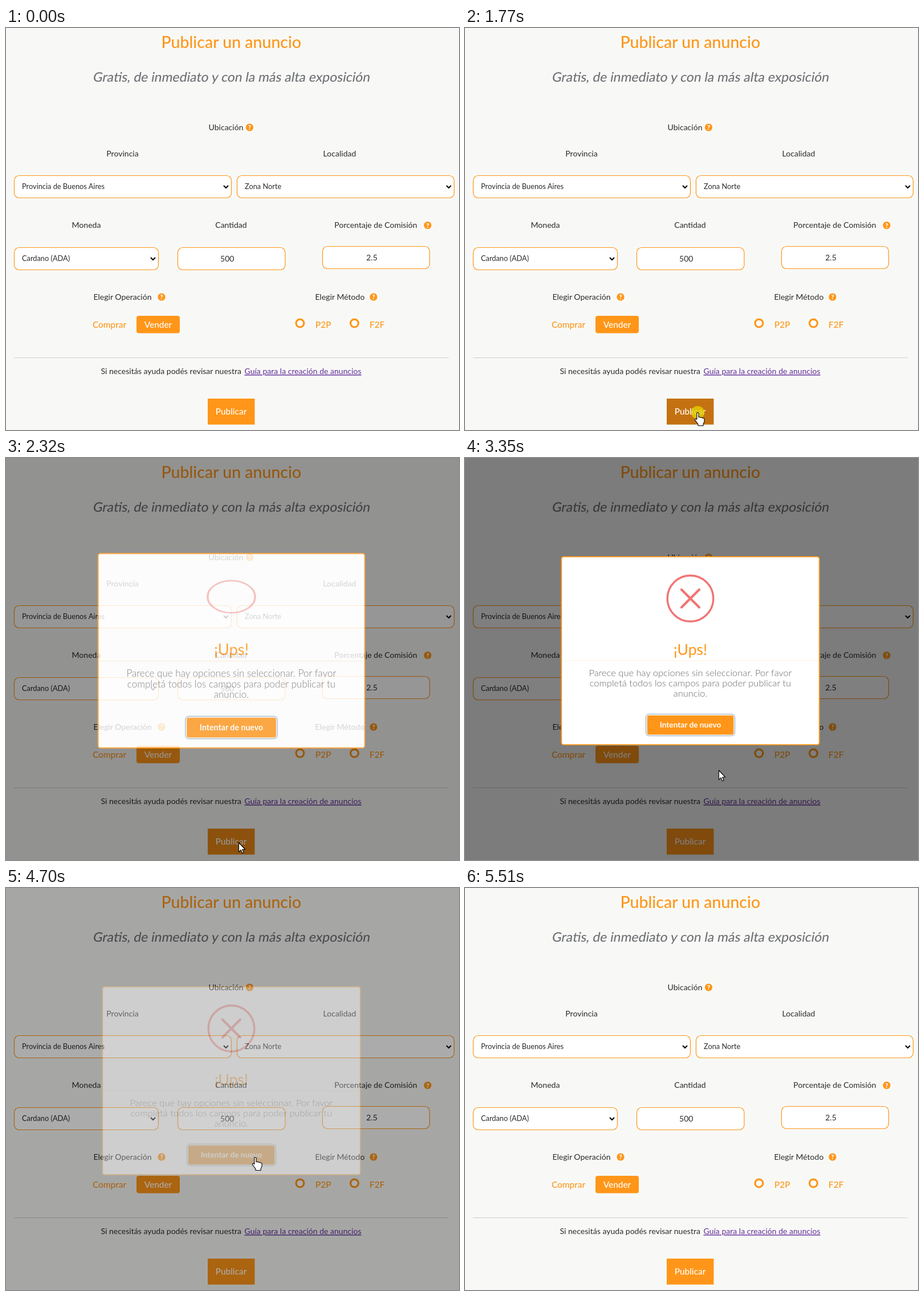
Animation of 795 by 704 pixels, one loop 6.1 s. Source, as an HTML page:

```html
<!DOCTYPE html>
<html lang="es">
<head>
<meta charset="utf-8">
<title>Publicar un anuncio</title>
<style>
html, body { margin: 0; width: 100%; height: 100%; overflow: hidden; background: #f8f9f7; }
svg { display: block; font: 14.05px Lato, "Open Sans", sans-serif; fill: #2b2b2b; }
.mid { text-anchor: middle; }
.orange { fill: #ff9619; }
.field { fill: #fff; stroke: #ff9619; stroke-width: 1.2; }
.opt { font-size: 12.8px; }
.big { font-size: 15.4px; font-weight: 500; }
.white { fill: #fff; }
.q { fill: #fff; font-size: 11px; font-weight: 900; text-anchor: middle; }
.line { fill: none; stroke: #000; stroke-width: 2; }
.mark { fill: none; stroke: #f27474; }
.cursor { fill: #fff; stroke: #000; stroke-width: 1.1; stroke-linejoin: round; }
</style>
</head>
<body>
<svg width="795" height="704" viewBox="0 0 795 704">
  <text class="mid orange" x="395.3" y="35" font-size="28.5" font-weight="500">Publicar un anuncio</text>
  <text class="mid" transform="translate(395 93.5) skewX(-10)" font-size="22.95" font-weight="500" fill="#707175">Gratis, de inmediato y con la más alta exposición</text>
  <g id="form">
    <path d="M14 577.5H777" stroke="#cfcfcd"/>
    <rect class="orange" x="229" y="504" width="76" height="30.5" rx="4"/>
    <rect id="publish" x="354" y="649" width="82.5" height="45.5"/>
    <text x="166.5" y="606">Si necesitás ayuda podés revisar nuestra</text>
    <text x="418.5" y="606" fill="#64309a" text-decoration="underline">Guía para la creación de anuncios</text>
    <g class="big orange">
      <text x="152" y="524.5">Comprar</text>
      <text x="543" y="524.5">P2P</text>
      <text x="638" y="524.5">F2F</text>
    </g>
    <g class="big mid white">
      <text x="267" y="524.5">Vender</text>
      <text x="395" y="677">Publicar</text>
    </g>
    <g fill="#fff" stroke="#ff9619" stroke-width="3.2">
      <circle cx="516" cy="517" r="6.9"/>
      <circle cx="611.5" cy="517" r="6.9"/>
    </g>
  </g>
  <g id="modal">
    <rect width="795" height="704" fill="#000" opacity=".5"/>
    <g id="popup">
      <rect x="169.3" y="172.8" width="452.6" height="329.4" rx="4" fill="#fff" stroke="#ff9619" stroke-width="1.8"/>
      <path d="M170 355H621" stroke="#fdefdc"/>
      <circle id="ring" class="mark" r="40.3" stroke-width="3.4"/>
      <path id="cross" class="mark" d="M-15.5-15.5 15.5 15.5M15.5-15.5-15.5 15.5" stroke-width="4.2" stroke-linecap="round"/>
      <text class="mid orange" x="395.5" y="345" font-size="26.5">¡Ups!</text>
      <g class="mid" font-size="16.5" font-weight="300" fill="#686868">
        <text x="395.5" y="381.5">Parece que hay opciones sin seleccionar. Por favor</text>
        <text x="395.5" y="399.5">completá todos los campos para poder publicar tu</text>
        <text x="395.5" y="417.5">anuncio.</text>
      </g>
      <rect x="317.5" y="448.5" width="156" height="38" rx="6" fill="#fff" stroke="#adc1d5" stroke-width="1.7"/>
      <rect id="retry" x="319.8" y="450.8" width="151.6" height="33.6" rx="3.5"/>
      <text class="mid white" x="395.5" y="472" font-size="13.7" font-weight="700">Intentar de nuevo</text>
    </g>
  </g>
  <circle id="click" r="11.5" fill="#e6d200" opacity=".78"/>
  <path id="arrow" class="cursor" d="M0 0V16.4L3.7 12.9 6.2 18.6 8.7 17.5 6.2 12H11.3Z"/>
  <path id="hand" class="cursor" d="M-1.6 1Q0-1 1.6 1V8.2Q3.4 7 5 8.8 6.8 7.8 8.2 9.6 11.4 9 11.6 12V16L9.6 20V23H.6V20.6L-2.6 16-5 12.6Q-5 10-3 10.6L-1.6 12.2Z"/>
</svg>
<script>
const $ = id => document.getElementById(id);
const form = $('form');

function add(parent, tag, attrs, text = '') {
  const el = document.createElementNS('http://www.w3.org/2000/svg', tag);
  for (const key in attrs) el.setAttribute(key, attrs[key]);
  el.textContent = text;
  parent.append(el);
}

for (const [x, y, text] of [
  [386, 178.5, 'Ubicación'], [204.5, 225, 'Provincia'], [585.5, 225, 'Localidad'],
  [141, 350, 'Moneda'], [395, 350, 'Cantidad'], [649, 350, 'Porcentaje de Comisión'],
  [204.5, 476, 'Elegir Operación'], [586, 476, 'Elegir Método']
]) add(form, 'text', { class: 'mid', x, y }, text);

for (const [x, y, width, text, isSelect] of [
  [14.5, 258.5, 381, 'Provincia de Buenos Aires', true],
  [405.5, 258.5, 381, 'Zona Norte', true],
  [14.5, 384.5, 253, 'Cardano (ADA)', true],
  [301.5, 384.5, 188.5, '500'],
  [555.5, 382.5, 188, '2.5']
]) {
  add(form, 'rect', { class: 'field', x, y, width, height: 39, rx: 8.5 });
  if (isSelect) {
    add(form, 'text', { class: 'opt', x: x + 13.5, y: y + 23.5 }, text);
    add(form, 'path', { class: 'line', d: `M${x + width - 13.5} ${y + 17.5}l4 4 4-4` });
  } else {
    add(form, 'text', { class: 'mid', x: x + width / 2 - 7.5, y: y + 24.5 }, text);
  }
}

for (const [cx, cy] of [[427.5, 174], [740, 345.5], [273, 471], [645, 471]]) {
  add(form, 'circle', { class: 'orange', cx, cy, r: 6.6 });
  add(form, 'text', { class: 'q', x: cx, y: cy + 4 }, '?');
}

const clamp = v => Math.max(0, Math.min(1, v));
const mix = (a, b, p) => a + (b - a) * p;
const smooth = u => u * u * (3 - 2 * u);
const glide = u => 1 - (1 - u) ** 1.7;

// The CSS "ease" curve
function ease(x) {
  x = clamp(x);
  let lo = 0, hi = 1;
  for (let i = 0; i < 20; i++) {
    const s = (lo + hi) / 2;
    if (.75 * s * (1 - s) + s ** 3 < x) lo = s; else hi = s;
  }
  return .3 * lo * (1 - lo) ** 2 + 3 * lo * lo * (1 - lo) + lo ** 3;
}

// Stops are [position, value], each span eased on its own
function keyed(u, stops) {
  if (u <= stops[0][0]) return stops[0][1];
  for (let i = 1; i < stops.length; i++) {
    const [a, from] = stops[i - 1], [b, to] = stops[i];
    if (u < b) return mix(from, to, ease((u - a) / (b - a)));
  }
  return stops.at(-1)[1];
}

// Start, end, from x, from y, to x, to y, easing
const moves = [
  [340, 985, 652, 698, 431, 671, glide],
  [985, 1220, 431, 671, 395, 670, smooth],
  [1220, 1440, 395, 670, 408.5, 673.5, smooth],
  [2940, 3350, 408.5, 673.5, 445.5, 547, smooth],
  [3630, 4070, 445.5, 547, 437.5, 471.5, smooth],
  [4840, 5520, 437.5, 471.5, 728, 698, glide]
];

function pointer(t) {
  const [start, end, x, y, toX, toY, curve] = moves.findLast(m => t >= m[0]) || moves[0];
  const p = curve(clamp((t - start) / (end - start)));
  return [mix(x, toX, p), mix(y, toY, p)];
}

const within = (t, a, b) => t >= a && t < b;
const show = (el, on) => el.setAttribute('visibility', on ? 'visible' : 'hidden');
const move = (el, x, y, sx = 1, sy = sx) =>
  el.setAttribute('transform', `translate(${x} ${y}) scale(${sx} ${sy})`);
const rgb = (a, b, p) => `rgb(${a.map((v, i) => mix(v, b[i], p))})`;
const ORANGE = [255, 150, 25];

function draw(t) {
  const hover = ease((t - 960) / 150) - ease((t - 2255) / 150);
  $('publish').setAttribute('fill', rgb(ORANGE, [196, 114, 17], hover));
  $('retry').setAttribute('fill', rgb(ORANGE, [230, 135, 22], within(t, 3930, 4840) ? 1 : 0));

  // The shade and the popup fade as one, and the popup fades on its own as well
  const fade = clamp((t - 2156) / 200) - clamp((t - 4632) / 200);
  $('modal').setAttribute('opacity', fade);

  const popup = $('popup');
  const scale = keyed((t - 2184) / 275, [[0, .7], [.45, 1.05], [.8, .95], [1, 1]]);
  popup.setAttribute('opacity', ease((t - 2160) / 205) - ease((t - 4630) / 225));
  popup.setAttribute('transform', `translate(395.5 337) scale(${scale}) translate(-395.5 -337)`);

  const u = (t - 2168) / 500, turn = ease(u);
  move($('ring'), 395.5, 246, 1, Math.abs(Math.cos((1 - turn) * 100 * Math.PI / 180)));
  $('ring').setAttribute('opacity', turn);
  const drop = keyed(u, [[.5, 26], [.8, -6], [1, 0]]);
  move($('cross'), 395.5, 246 + drop, keyed(u, [[.5, .4], [.8, 1.15], [1, 1]]));
  $('cross').setAttribute('opacity', keyed(u, [[.5, 0], [1, 1]]));

  const [x, y] = pointer(t);
  const visible = within(t, 360, 5510);
  const pointing = within(t, 960, 2170) || within(t, 3930, 4840);
  show($('arrow'), visible && !pointing);
  show($('hand'), visible && pointing);
  show($('click'), within(t, 1770, 1950) || within(t, 4330, 4630));
  for (const id of ['arrow', 'hand', 'click']) move($(id), x, y);
}

const begin = performance.now();
function tick() {
  draw((performance.now() - begin) % 6100);
  requestAnimationFrame(tick);
}
tick();
</script>
</body>
</html>
```
